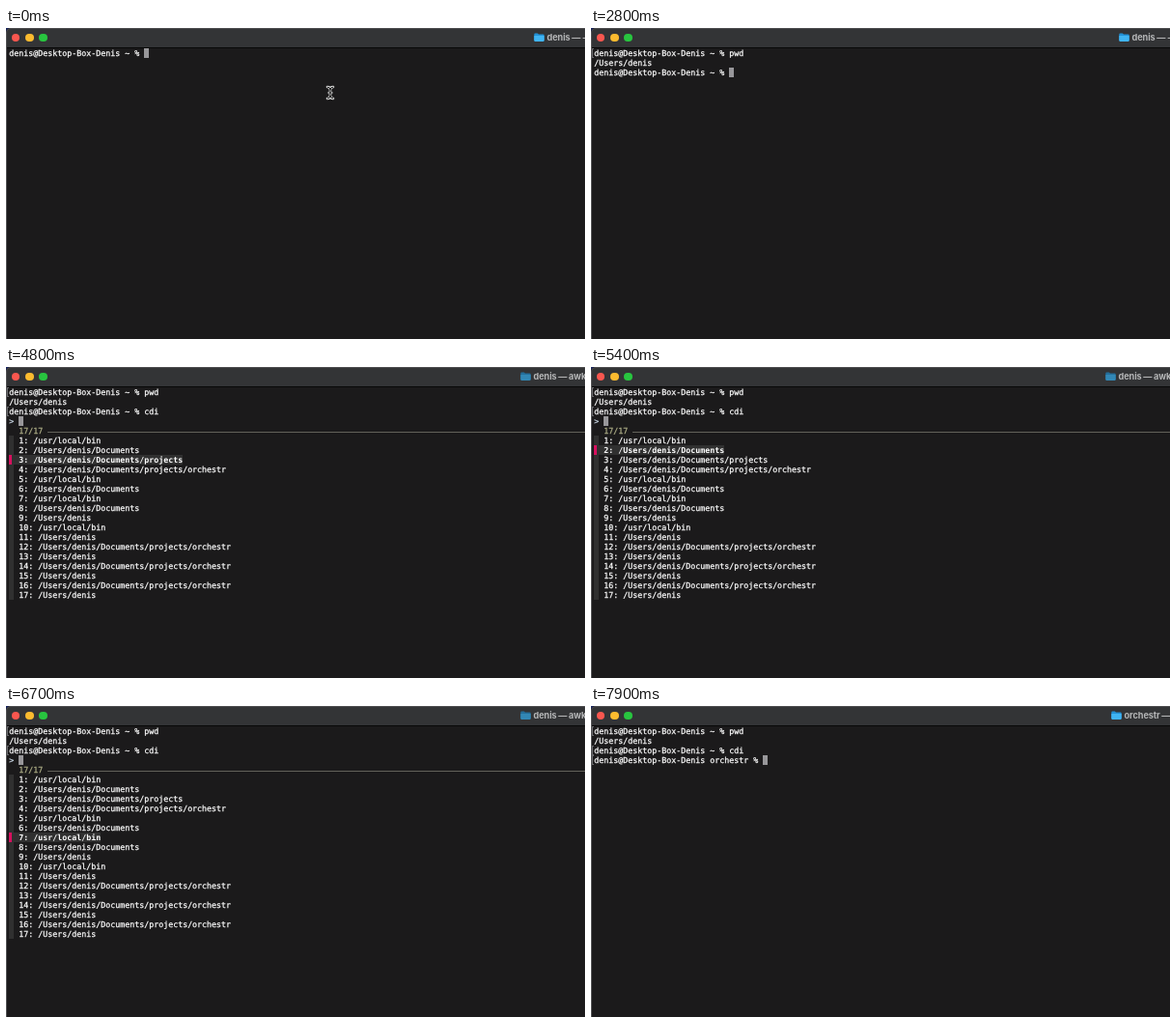
An HTML page that plays this animation: 600 px wide and 322 px high, repeating every 8 s.

```html
<!DOCTYPE html>
<html lang="en">
<head>
<meta charset="utf-8">
<title>Terminal directory picker</title>
<style>
html, body { margin: 0; width: 100%; height: 100%; overflow: hidden; background: #14205c; }
#win { position: absolute; left: 0; top: 0; width: 600px; height: 322px; overflow: hidden;
  background: #1b1a1b; border-top-left-radius: 5px; }
#bar { position: absolute; left: 0; top: 0; width: 600px; height: 20px; background: #333436;
  border-bottom: 1px solid #080808; }
#edge { position: absolute; inset: 0; border: solid #4c4c4e; border-width: 1px 0 0 1px;
  border-top-left-radius: 5px; }
.light { position: absolute; top: 5.6px; width: 8.6px; height: 8.6px; border-radius: 50%; }
#title { position: absolute; top: 3px; height: 14px; white-space: pre; color: #b5b6b7;
  font: 700 9.2px/14px Inter, sans-serif; letter-spacing: -0.12px; word-spacing: -0.4px; }
#folder { position: absolute; top: 4.6px; }
#screen { position: absolute; left: 0; top: 0; color: #fff;
  font: 8.306px/10px "DejaVu Sans Mono", "Liberation Mono", monospace;
  text-rendering: geometricPrecision; }
#screen > * { position: absolute; height: 10px; white-space: pre; }
.text { -webkit-text-stroke: 0.25px; }
.mark { box-sizing: border-box; width: 2px; border: 1px solid #68686b; border-right: 0; }
.cursor { width: 5px; background: #98979a; }
.gutter { width: 5px; background: #303030; }
.pointer { width: 3px; background: #d7105f; }
.current { background: #303030; font-weight: bold; }
.rule { height: 1px !important; background: #62625a; }
#mouse { position: absolute; left: 330px; top: 59px; }
</style>
</head>
<body>
<div id="win">
  <div id="bar">
    <i class="light" style="left:5.7px;background:#f9574f"></i>
    <i class="light" style="left:20px;background:#fcbb2f"></i>
    <i class="light" style="left:34.2px;background:#28c53f"></i>
    <svg id="folder" width="11" height="10" viewBox="0 0 11 10">
      <path class="back" d="M.3 1.4Q.3.4 1.3.4H3.9L5 1.5H9.7Q10.7 1.5 10.7 2.5V8H.3Z"/>
      <path class="front" d="M.3 3H10.7V8.1Q10.7 9.1 9.7 9.1H1.3Q.3 9.1.3 8.1Z"/>
    </svg>
    <div id="title"></div>
  </div>
  <div id="edge"></div>
  <div id="screen"></div>
  <svg id="mouse" width="12" height="16" viewBox="0 0 12 16" fill="none" stroke-linecap="round">
    <defs><path id="shape" d="M3 2Q6 2 6 5V11Q6 14 3 14M9 2Q6 2 6 5M6 11Q6 14 9 14M4.8 8H7.2"/></defs>
    <g id="beam">
      <use href="#shape" stroke="#e8e8e8" stroke-width="2.6"/>
      <use href="#shape" stroke="#111" stroke-width="1"/>
    </g>
  </svg>
</div>
<script>
const LOOP = 8000, CELL = 5, LEFT = 3.3, TOP = 21;
const USER = "denis", HOST = USER + "@Desktop-Box-Denis";
const HOME = "/Users/" + USER, DOCS = HOME + "/Documents";
const PROJECTS = DOCS + "/projects", REPO = PROJECTS + "/orchestr", BIN = "/usr/local/bin";
const DIRS = [BIN, DOCS, PROJECTS, REPO, BIN, DOCS, BIN, DOCS, HOME, BIN,
  HOME, REPO, HOME, REPO, HOME, REPO, HOME];

// [time, value] steps
const FIRST = [[0, ""], [200, "p"], [400, "pw"], [700, "pwd"]];
const SECOND = [[0, ""], [3200, "c"], [3400, "cd"], [3600, "cdi"]];
const PICK = [[4200, 1], [4600, 2], [4800, 3], [4900, 4], [5100, 3], [5300, 2], [5500, 1],
  [5700, 2], [5900, 3], [6100, 4], [6200, 5], [6600, 6], [6700, 7], [6900, 6], [7100, 5], [7300, 4]];
const PHASE = [[0, "type"], [1200, "run"], [1300, "type2"], [4100, "wait"],
  [4200, "pick"], [7600, "wait"], [7700, "done"]];
const TITLES = {
  shell: { x: 547, text: USER + " — -zsh", back: "#2291d6", front: "#40b4f2" },
  pick: { x: 533, text: USER + " — awk", back: "#236f9c", front: "#3287b5" },
  done: { x: 539, text: "orchestr — -zsh", back: "#2291d6", front: "#40b4f2" }
};

const $ = id => document.getElementById(id);
const at = (steps, t) => steps.reduce((v, [time, next]) => t >= time ? next : v, steps[0][1]);

function add(cls, col, row, text = "", color = "") {
  const el = document.createElement("div");
  el.className = cls;
  el.textContent = text;
  el.style.left = LEFT + col * CELL + "px";
  el.style.top = TOP + row * 10 + "px";
  el.style.color = color;
  $("screen").append(el);
  return el;
}

function mark(row) { add("mark", -0.5, row); }

function prompt(row, dir, typed, live) {
  const line = `${HOST} ${dir} % ${typed}`;
  add("text", 0, row, line);
  if (live) add("cursor", line.length, row);
}

function picker(choice) {
  add("text", 0, 3, ">", "#c5d3e0");
  add("cursor", 2, 3);
  add("text", 2, 4, "17/17", "#afaf87");
  const rule = add("rule", 8, 4.55);
  rule.style.width = "557px";
  DIRS.forEach((dir, i) => {
    const row = i + 5, on = i + 1 === choice;
    add("gutter", 0, row);
    if (on) add("pointer", 0, row);
    const label = `${i + 1}: ${dir}`;
    if (on) add("current", 1, row, " " + label);
    else add("text", 2, row, label);
  });
}

function setTitle({ x, text, back, front }) {
  $("title").textContent = text;
  $("title").style.left = x + 13.6 + "px";
  $("folder").style.left = x + "px";
  document.querySelector(".back").style.fill = back;
  document.querySelector(".front").style.fill = front;
}

let shown = "";
function draw(t) {
  const phase = at(PHASE, t), first = at(FIRST, t), second = at(SECOND, t), choice = at(PICK, t);
  const key = [phase, first, second, choice].join();
  if (key === shown) return;
  shown = key;
  $("screen").textContent = "";
  $("beam").style.display = first ? "none" : "";
  setTitle(TITLES[phase] || TITLES.shell);

  prompt(0, "~", first, phase === "type");
  if (phase === "type") return;
  mark(0);
  if (phase === "run") { add("cursor", 0, 1); return; }
  add("text", 0, 1, HOME);
  prompt(2, "~", second, phase === "type2");
  if (phase === "type2") return;
  mark(2);
  if (phase === "wait") add("cursor", 0, 3);
  if (phase === "pick") picker(choice);
  if (phase === "done") { mark(3); prompt(3, "orchestr", "", true); }
}

const start = performance.now();
function tick(now) {
  draw(Math.max(0, now - start) % LOOP);
  requestAnimationFrame(tick);
}
draw(0);
requestAnimationFrame(tick);
</script>
</body>
</html>
```
